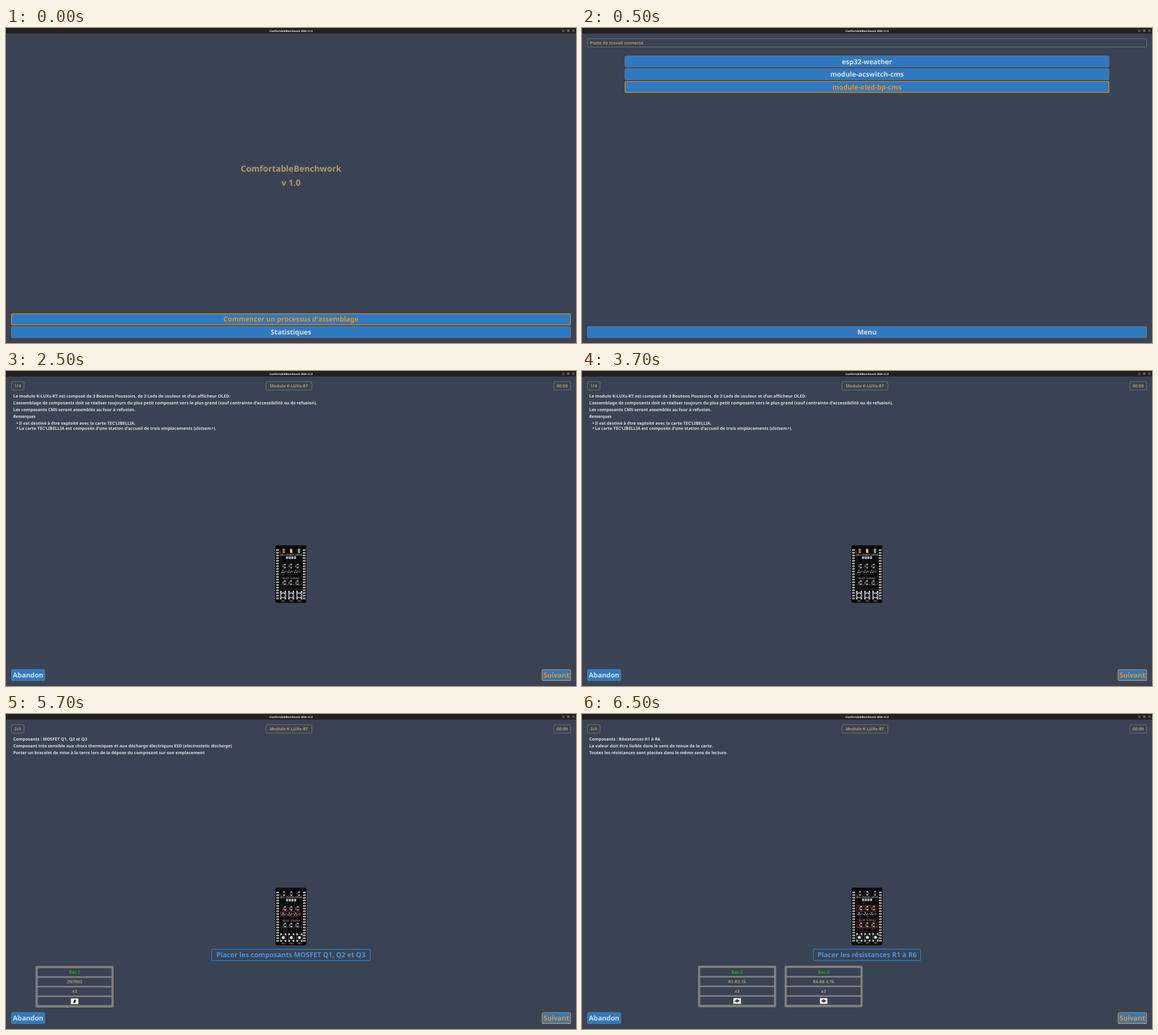
These frames come from a looping animation (1006x557 px, 8000 ms). An HTML page:

```html
<!DOCTYPE html>
<html lang="fr">
<head>
<meta charset="utf-8">
<title>Poste d'assemblage</title>
<style>
html, body { margin: 0; width: 100%; height: 100%; overflow: hidden; background: #394353; }
svg { display: block; width: 1006px; height: 557px; }
text { font-family: "Noto Sans", "Open Sans", sans-serif; font-weight: 700; white-space: pre; text-rendering: geometricPrecision; }
.it { font-style: italic; }
.silk { font-family: "DejaVu Sans Mono", monospace; font-weight: 400; }
</style>
</head>
<body>
<svg id="stage" viewBox="0 0 1006 557"></svg>
<script>
const APP = "ComfortableBenchwork";
const MODULE = "K-LUXs-RT";
const CARD = "TEC’LIBELLIA";
const LOOP = 8000;
const STARTS = [0, 500, 2500, 4500, 6500];
const C = {
  bg: "#394353", blue: "#2f79c0", orange: "#f78f0c", light: "#dedede", tan: "#b2976b",
  grey: "#808080", green: "#10b81c", sky: "#4a94e2", pad: "#d3d7d4", red: "#d01c20", trace: "#55504e"
};

const rect = (x, y, w, h, fill, extra = "") =>
  `<rect x="${x}" y="${y}" width="${w}" height="${h}" fill="${fill}" ${extra}/>`;
const path = (d, stroke, width = 0.5) =>
  `<path d="${d}" fill="none" stroke="${stroke}" stroke-width="${width}"/>`;
const circle = (x, y, r, fill, extra = "") => `<circle cx="${x}" cy="${y}" r="${r}" fill="${fill}" ${extra}/>`;
// y is the middle of the capitals
const text = (str, x, y, size, fill, anchor = "middle", cls = "") =>
  `<text x="${x}" y="${y + size * 0.357}" font-size="${size}" fill="${fill}" text-anchor="${anchor}" class="${cls}">${str}</text>`;
const italic = str => `<tspan class="it">${str}</tspan>`;

function button(label, x, y, w, focus) {
  const edge = focus ? C.orange : "#62809c";
  const lw = focus ? 1.2 : 0.8;
  return rect(x + lw / 2, y + lw / 2, w - lw, 20.6 - lw, C.blue, `rx="2" stroke="${edge}" stroke-width="${lw}"`) +
    text(label, x + w / 2, y + 10.4, 12, focus ? C.orange : C.light);
}

function field(label, x, w, left) {
  return rect(x + 0.4, 18.9, w - 0.8, 14.8, "none", `rx="2.2" stroke="#7d8085" stroke-width="0.8"`) +
    text(label, left ? x + 5 : x + w / 2, 26.5, 7.5, C.tan, left ? "start" : "middle");
}

function header(step) {
  return field(step, 9, 23.2) + field("Module " + MODULE, 458.5, 81.7) + field("00:00", 966.4, 30.6) +
    button("Abandon", 9, 527.4, 60) + button("Suivant", 945.6, 527.4, 51.4, true);
}

const lines = rows => rows.map((row, i) => text(row, 12.7, 44 + 12 * i, 7.5, C.light, "start")).join("");

function order(label, x, y, w) {
  return rect(x + 0.6, y + 0.6, w - 1.2, 20, "none", `rx="1.2" stroke="#2f80d0" stroke-width="1.2"`) +
    text(label, x + w / 2, y + 10.5, 12.1, C.sky);
}

function bin(x, y, labels, part) {
  let out = rect(x, y, 137.7, 73.6, C.grey, 'rx="2"');
  for (let i = 0; i < 4; i++) out += rect(x + 3.8, y + 4 + 17 * i, 130.2, 14.2, C.bg, 'rx="1"');
  labels.forEach((s, i) => { out += text(s, x + 68.9, y + 11 + 17 * i, 7.5, i ? C.tan : C.green); });
  return out + rect(x + 62.3, y + 57.5, 13.2, 10, "#f3f3f1") + `<g transform="translate(${x + 68.9} ${y + 62.5})">${part}</g>`;
}

const transistor = '<path d="M-2.4 1.7L-.4-3.2 2.7-2.3 1.1 2.9-1.7 3.1Z" fill="#28282a"/>' +
  path("M-2.8 2.4l1.2.6M2.3-.6l1 .3", "#8d8d8d", 0.7);
const resistor = '<path d="M-5.3 .2L-.4-3.5 5.4-.5.2 3.5Z" fill="#a4a4a4"/>' +
  '<path d="M-3.9 .1L0-2.9 4-.7.3 2.3Z" fill="#222"/><path d="M-1.5 0L1.2-1.1" stroke="#ddd" stroke-width=".6"/>';

const COLS = [15, 28, 41.6];

function chip(x, y, name) {
  return rect(x - 1.5, y - 3.6, 3, 1.7, C.pad) + rect(x - 1.5, y + 1.9, 3, 1.7, C.pad) +
    rect(x - 1.5, y - 3.6, 3, 7.2, "none", 'stroke="#858885" stroke-width=".4"') +
    (name ? `<text class="silk" transform="translate(${x - 2.1} ${y + 2.3}) rotate(-90)" font-size="3.8" fill="#c7c9c7">${name}</text>` : "");
}

function board(x, y, mounted, marks) {
  let out = rect(0, 0, 54.6, 101.8, "#0b0b0c", 'rx="3"');
  out += path("M10 17V31L15 36V90M42 31V43L46 48V82M28 20V80M22 26V38L12 48M34 26V38L42 46M10 56L20 62V85M46 55L37 63V86", C.trace, 0.45);
  out += path("M8 51H40L47 45M9 72L15 78H45", "#6d3434", 0.45);
  out += path("M6.5 18H49M8.5 18V11H6.5M9 69.7H46V66", "#8a8d8b", 0.5);

  for (let i = 0; i < 19; i++) {
    const py = 8.4 + i * 4.75;
    for (const px of [3.9, 51]) {
      out += rect(px - 2.3, py - 1.35, 4.6, 2.7, C.pad, 'rx=".9"') + circle(px, py, 0.7, "#2b2b2b");
    }
  }

  COLS.forEach((cx, i) => {
    if (mounted) {
      out += rect(cx - 2, 6, 4, 7.6, "#aaa084") +
        rect(cx - 1.5, 7.2, 3, 5, ["#f23a28", "#f4d822", "#28dd45"][i]);
    } else {
      out += chip(cx, 10.3);
    }
  });
  out += text("RED ORANGE GREEN", 28, 16.7, 3.9, "#b5b8b6", "middle", "silk");
  for (let i = 0; i < 4; i++) {
    out += rect(18.8 + i * 4.7, 19.6, 3.5, 4.3, C.pad, 'rx=".6"') + circle(20.5 + i * 4.7, 21.8, 0.75, "#292929");
  }

  [17, 28, 39.5].forEach((cx, i) => {
    out += chip(cx, 36.5, "R" + (i + 1)) + chip(cx, 66, "R" + (i + 4));
    const q = cx - 3.5;
    out += rect(q - 1.3, 44, 2.3, 1.5, C.pad) + rect(q - 2.8, 47, 2, 1.5, C.pad) + rect(q + 0.6, 47, 2, 1.5, C.pad);
    out += text("Q" + (i + 1), q + 5.3, 46.3, 3.9, "#bdbfbd", "middle", "silk");
    if (mounted) {
      out += rect(q - 1.9, 44.9, 3.6, 2.2, "#222326") + rect(cx - 1.3, 34.7, 2.6, 3.6, "#27282b") + rect(cx - 1.3, 64.2, 2.6, 3.6, "#27282b");
    }
  });
  out += text("OLED-128X64", 27.8, 57.7, 4.4, "#aeb1af", "middle", "silk");

  [13.7, 28, 42.3].forEach((cx, i) => {
    const cy = 88;
    out += rect(cx - 5.3, cy - 5.3, 10.6, 10.6, "#17191b", 'stroke="#858886" stroke-width=".5"');
    for (const dx of [-4, 4]) for (const dy of [-6, 6]) out += rect(cx + dx - 1.2, cy + dy - 1.6, 2.4, 3.2, C.pad);
    if (mounted) {
      out += rect(cx - 5, cy - 4.5, 10, 10, "#8e989e", 'rx=".8"') +
        rect(cx - 4, cy - 3.5, 8, 8, "#b9c1c4", 'rx="2"') +
        circle(cx, cy + 0.5, 3.4, "#17191b");
    } else {
      out += circle(cx, cy, 2.6, "#d9dbd9");
    }
    out += text("SW" + (i + 1), cx, 98.2, 3.9, "#b5b8b6", "middle", "silk");
  });
  return `<g transform="translate(${x} ${y})">${out}${marks || ""}</g>`;
}

const mark = (x, y, w, h) => rect(x, y, w, h, "none", `rx="1" stroke="${C.red}" stroke-width=".75"`);

const windowBar = rect(0, 0, 1006, 9.8, "#242122") +
  text(APP + " 2024 v1.0", 503, 4.9, 4.55, "#f4f4f4") +
  [983.3, 992.3, 1001.3].map(x => circle(x, 4.8, 2.6, "#403d3d")).join("") +
  path("M982.2 5.5h2.2M991.3 3.8h2v2h-2zM1000.4 3.9l1.8 1.8m0-1.8l-1.8 1.8", "#e4e4e4", 0.45);

const bullet = (str, y) => circle(20, y + 0.1, 1.25, C.light) + text(str, 23.1, y, 7.5, C.light, "start");

const scenes = [
  text(APP, 503, 248.7, 14.9, C.tan) + text("v 1.0", 503, 273.6, 14.9, C.tan) +
    button("Commencer un processus d'assemblage", 9, 504.8, 988, true) +
    button("Statistiques", 9, 527.4, 988),

  field("Poste de travail connecté", 9, 988, true) +
    ["esp32-weather", "module-acswitch-cms", "module-oled-bp-cms"]
      .map((s, i) => button(s, 75.4, 48.9 + 22.5 * i, 855.2, i === 2)).join("") +
    button("Menu", 9, 527.4, 988),

  header("1/4") + lines([
    `Le module ${MODULE} est composé de 3 Boutons Poussoirs, de 3 Leds de couleur et d’un afficheur OLED.`,
    "L’assemblage de composants doit se réaliser toujours du plus petit composant vers le plus grand (sauf contrainte d’accessibilité ou de refusion).",
    "Les composants CMS seront assemblés au four à refusion.",
    italic("Remarques")
  ]) + bullet(`Il est destiné à être exploité avec la carte ${CARD}.`, 92) +
    bullet(`La carte ${CARD} est composée d’une station d’accueil de trois emplacements (${italic("slots")}em&gt;).`, 101) +
    board(475.3, 308.3, true),

  header("2/4") + lines([
    "Composants : MOSFET Q1, Q2 et Q3",
    `Composant très sensible aux chocs thermiques et aux décharge électriques ESD (${italic("electrostatic discharge")})`,
    "Porter un bracelet de mise à la terre lors de la dépose du composant sur son emplacement"
  ]) + board(475.6, 307.3, false, mark(9, 42.2, 34.8, 7.6)) +
    order("Placer les composants MOSFET Q1, Q2 et Q3", 362.3, 415.6, 281) +
    bin(52.2, 445.5, ["Bac 1", "2N7002", "x3"], transistor),

  header("3/4") + lines([
    "Composants : Résistances R1 à R6",
    "La valeur doit être lisible dans le sens de tenue de la carte.",
    "Toutes les résistances sont placées dans le même sens de lecture."
  ]) + board(475.6, 306.9, false, mark(9.5, 31.8, 34.5, 10.2) + mark(9.5, 61.5, 34.5, 9.8)) +
    order("Placer les résistances R1 à R6", 407.8, 415.1, 190.4) +
    bin(204.9, 445, ["Bac 2", "R1-R3 1k", "x3"], resistor) +
    bin(357.6, 445, ["Bac 3", "R4-R6 4,7k", "x3"], resistor)
];

const stage = document.getElementById("stage");
stage.innerHTML = rect(0, 0, 1006, 557, C.bg) + windowBar + scenes.map(s => `<g class="scene">${s}</g>`).join("");
const groups = [...stage.querySelectorAll(".scene")];
const origin = performance.now();

function draw(now) {
  const t = Math.max(0, now - origin) % LOOP;
  const current = STARTS.filter(s => s <= t).length - 1;
  groups.forEach((g, i) => { g.style.display = i === current ? "" : "none"; });
  requestAnimationFrame(draw);
}
draw(origin);
</script>
</body>
</html>
```
